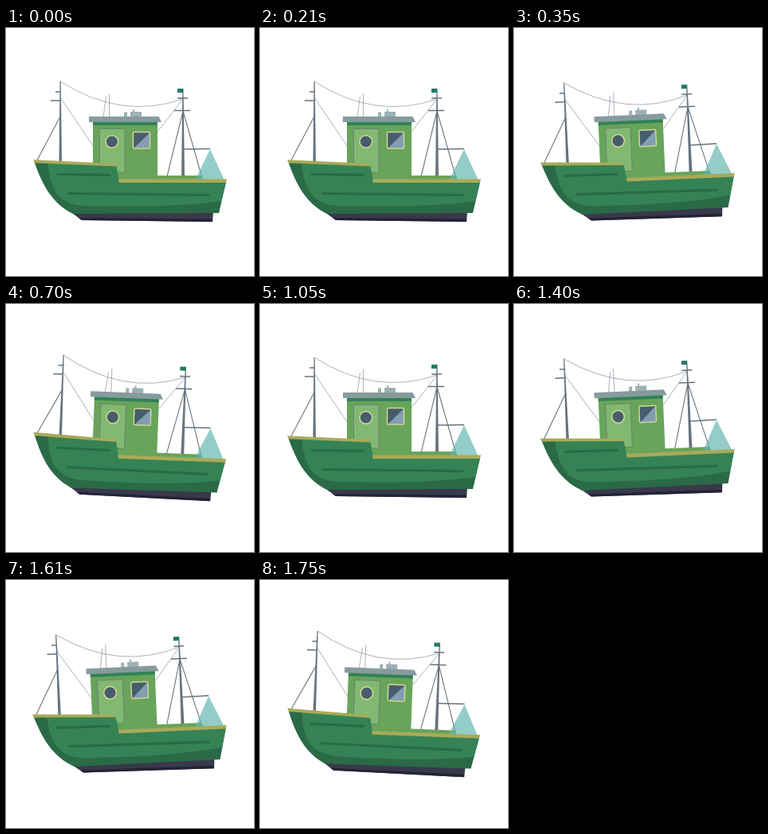
An HTML page that plays this animation: 311 by 311 pixels, repeating every 2.1 s.

```html
<!DOCTYPE html>
<html lang="en">
<head>
<meta charset="utf-8">
<title>Rocking fishing boat</title>
<style>
  html, body { margin: 0; width: 100%; height: 100%; overflow: hidden; background: #fff; }
  svg { display: block; width: 100%; height: 100%; }
  .rope { fill: none; stroke: #6d7780; stroke-width: 1.1; }
  .thin { stroke: #77818a; stroke-width: .6; }
  .mast { fill: #68737d; }
  .spar { fill: none; stroke: #68737d; stroke-width: 1.5; }
  .stripe { fill: none; stroke: #2a6a47; stroke-width: 3.2; stroke-linecap: round; }
  .trim { fill: #a9aa59; }
  .metal { fill: #9eb0b7; }
  .frame { stroke: #d4d696; stroke-width: 1.5; }
</style>
</head>
<body>
<svg viewBox="0 0 311 311">
  <g id="boat">
    <!-- rigging -->
    <path class="rope thin" d="M68 67Q145 116 222 89M68 87L110 149M222 89L190 130"/>
    <path class="rope" d="M68 111L39 166M222 104L201.8 187M222 104L246.5 190"/>
    <path class="rope thin" d="M122 112L125.5 86M129.5 112V82"/>

    <!-- masts -->
    <path class="mast" d="M67.6 67H68.8L70 168H66.5ZM221.3 76H222.5L224 188H220Z"/>
    <path class="spar" d="M62 80H69M56 91H69M215 88H228M211 103.5H231M222 152L256 151.5"/>
    <path fill="#1f7d62" d="M215 76H222V81H215Z"/>

    <!-- cabin and deck -->
    <path fill="#68a45a" d="M109 118H190V185H246L248 191H109Z"/>
    <path fill="#328255" d="M109 117H190V122H109Z"/>
    <path class="metal" d="M148 105.5H152V112H148ZM156 105H170V112H156ZM159 102H161V106H159Z"/>
    <path fill="#879b9d" d="M104 111H191.5L195 118H104Z"/>
    <rect x="117.5" y="126.5" width="31.5" height="54.5" rx="1" fill="#81b972" stroke="#6d8370"/>
    <circle class="frame" cx="132.8" cy="142.5" r="7.8" fill="#465d6c"/>
    <rect x="159.5" y="130.5" width="21" height="20.5" rx="1.5" fill="#465d6c"/>
    <path fill="#819eb3" d="M180 131.5V150.5H160.5Z"/>
    <rect class="frame" x="159.5" y="130.5" width="21" height="20.5" rx="1.5" fill="none"/>

    <!-- net -->
    <path fill="#62b5ad" opacity=".68" d="M256 152L274 191H237Z"/>

    <!-- hull -->
    <path fill="#38394b" d="M80 230L95 241L259 243L260 230Z"/>
    <path fill="#242336" d="M91 238L259 239.5V243L95 241Z"/>
    <path fill="#2a6a47" d="M35.5 168L138 172L142 193H276L267 232L84 233C55.5 219 44.5 193 35.5 168Z"/>
    <path fill="#358355" d="M52 169L138 172L142 193H276L270 217Q210 226 98 223C63 221 56 200 52 169Z"/>
    <path class="trim" d="M34 165.3L137 170L138.5 173.5L36 169.3ZM141 189.5H277L276 194H141.7Z"/>
    <path class="stripe" d="M65 183.5L130 184.3M79 207.5L254 209.5"/>
  </g>
</svg>
<script>
  const boat = document.getElementById("boat");
  const poseTime = 350;
  const poses = ["", "rotate(-2.5 106 194)", "rotate(2.2 150 168)"];

  function draw(now) {
    const pose = Math.floor(now / poseTime) % poses.length;
    boat.setAttribute("transform", poses[pose]);
    requestAnimationFrame(draw);
  }
  draw(performance.now());
</script>
</body>
</html>
```
